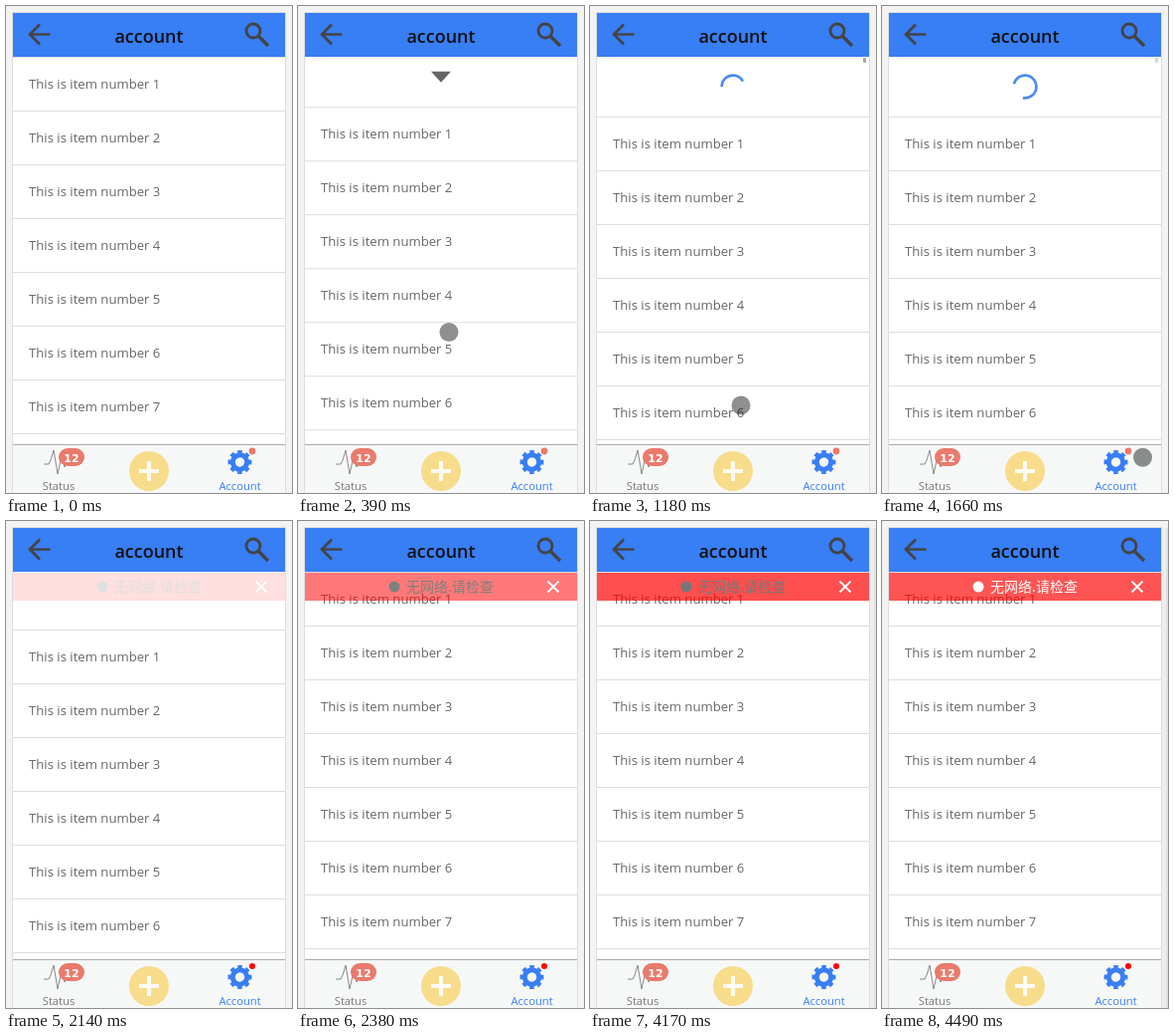
Recreate the animation shown at these times as an HTML page. Size 288 by 489 pixels, loop 5.34 s.

```html
<!DOCTYPE html>
<html lang="en">
<head>
<meta charset="utf-8">
<title>Pull to refresh</title>
<style>
  html, body { margin: 0; width: 100%; height: 100%; overflow: hidden; background: #f3f3f3; }
  svg { display: block; width: 288px; height: 489px; font-family: "Open Sans", "Noto Sans", sans-serif; }
  .item { font-size: 13.15px; fill: #666; }
  .tab { font-size: 11.2px; text-anchor: middle; }
  .line { fill: none; stroke: #444; }
</style>
</head>
<body>
<svg viewBox="0 0 288 489">
  <clipPath id="view"><path d="M7 51H281V440H7z"/></clipPath>
  <path d="M0 0H288V489H0z" fill="#f3f3f3"/>
  <g id="gutter">
    <path d="M281 7H288V489H281z" fill="#eee"/>
    <path d="M286 7H288V489H286z" fill="#e0e0e0"/>
  </g>
  <path d="M6 6H282V489H6z" fill="#ddd"/>
  <path d="M7 7H281V489H7z" fill="#fff"/>

  <g clip-path="url(#view)">
    <g id="list">
      <path id="arrow" d="M-10-5.5H10L0 5.5z" fill="#666"/>
      <g id="spinner">
        <circle id="arc" r="11.4" pathLength="163.4" fill="none" stroke="#4b8bf4" stroke-width="2.6"/>
      </g>
    </g>
    <rect id="thumb" x="275" y="52" width="3" height="5" rx="1"/>
  </g>

  <path d="M7 7H281V51H7z" fill="#387ef5"/>
  <path class="line" d="M44.5 28.5H25M34 18.5L24 28.5L34 38.5" stroke-width="2.7"/>
  <text x="144" y="36.5" font-size="18" font-weight="600" text-anchor="middle" fill="#111">account</text>
  <circle class="line" cx="249" cy="25" r="7" stroke-width="2.8"/>
  <path class="line" d="M254 30L264 40" stroke-width="3.4"/>

  <g id="notice">
    <path id="noticeFill" d="M7 52H281V80H7z" fill="#f00"/>
    <g id="noticeText">
      <circle cx="97" cy="66" r="5.5"/>
      <text x="109" y="71" font-size="14" style="font-family: 'Noto Sans CJK SC', 'Noto Sans CJK', sans-serif">无网络.请检查</text>
    </g>
    <path d="M251.500 60.500L262.500 71.500M262.500 60.500L251.500 71.500" stroke="#fff" stroke-width="1.8"/>
  </g>

  <path d="M7 440H281V489H7z" fill="#f6f8f8"/>
  <path d="M7 440H281V441H7z" fill="#aaa"/>
  <path d="M38 460H43L45 456L48 446L52 470L56 452L59 463L61 459H67" fill="none" stroke="#888"/>
  <rect x="53" y="444" width="26" height="18" rx="9" fill="#ea7a6c"/>
  <text x="66" y="457.500" font-size="11" font-weight="700" text-anchor="middle" fill="#fff" style="font-family: 'DejaVu Sans', sans-serif">12</text>
  <text class="tab" x="53" y="486" fill="#777">Status</text>
  <circle cx="144" cy="467" r="20" fill="#f7dc8b"/>
  <path d="M134 467H154M144 457V477" stroke="#fdfbf4" stroke-width="4"/>
  <g transform="translate(235.5 458) rotate(-12)" fill="none" stroke="#387ef5">
    <circle r="7.200" stroke-width="5"/>
    <circle r="10.300" stroke-width="3.400" pathLength="16" stroke-dasharray="1.1 .9"/>
  </g>
  <text class="tab" x="235.5" y="486" fill="#387ef5">Account</text>
  <circle id="dot" cx="248" cy="447"/>
  <circle id="pointer" r="9.500" fill-opacity=".44"/>
</svg>
<script>
const LOOP = 5340, HOLD = 60, PULL = 87, RELEASE = 900, DONE = 1890, ROW = 54;
const el = id => document.getElementById(id);
const set = (id, attrs) => {
  for (const name in attrs) el(id).setAttribute(name, attrs[name]);
};
const show = (id, on) => set(id, { visibility: on ? "visible" : "hidden" });
const ramp = (t, from, to) => Math.min(1, Math.max(0, (t - from) / (to - from)));
const mix = (a, b, p) => a + (b - a) * p;
const smooth = p => p * p * (3 - 2 * p);
const cubic = p => p < .5 ? 4 * p ** 3 : 1 - (2 - 2 * p) ** 3 / 2;

let rows = "";
for (let i = 0; i < 9; i++) {
  rows += `<path d="M7 ${i * ROW}h274v1h-274z" fill="#ddd"/>
    <text class="item" x="23" y="${i * ROW + 32}">This is item number ${i + 1}</text>`;
}
el("list").insertAdjacentHTML("beforeend", rows);

function listOffset(t) {
  if (t < RELEASE) return PULL * smooth(ramp(t, 60, 660));
  if (t < 1500) return mix(PULL, HOLD, cubic(ramp(t, RELEASE, 1150)));
  return HOLD * (1 - cubic(ramp(t, 2090, 2340)));
}

// One arc grows and shrinks alternately, mirrored on every second step.
function drawSpinner(t) {
  const clock = t + 1745, step = Math.floor(clock / 650) % 8;
  const v = cubic(clock % 650 / 650), odd = step % 2;
  const turn = [0, -101, -90, -11, -180, 79, -270, -191][step];
  set("arc", {
    transform: `scale(${odd ? -1 : 1} 1) rotate(${turn})`,
    "stroke-dasharray": odd ? 128 + 58 * v : 188 - 58 * v,
    "stroke-dashoffset": odd ? 182 * v : 182 - 182 * v
  });
  set("spinner", { transform: `translate(144 -30) scale(${1 - ramp(t, DONE, 2090)})` });
  show("spinner", t >= RELEASE && t < 2090);
}

function drawPointer(t) {
  const down = smooth(ramp(t, 1190, 1420)), out = smooth(ramp(t, 1420, 1740));
  const pulled = 227 + 2 * (t < RELEASE ? listOffset(t) : PULL);
  set("pointer", {
    cx: 152 + 8 * down + 121 * out,
    cy: pulled + 43 * down + 11 * out
  });
  show("pointer", t >= 70 && t < 1740);
}

function draw(t) {
  set("list", { transform: `translate(0 ${51 + listOffset(t)})` });
  set("arrow", { transform: `translate(144 -30) rotate(${180 * ramp(t, 500, 700)})` });
  show("arrow", t < RELEASE);
  drawSpinner(t);
  drawPointer(t);
  set("thumb", { opacity: .35 * (ramp(t, 470, 770) - ramp(t, 1500, 1800)) });
  show("gutter", t >= 1740 && t < 1900 || t >= 2930);
  const offline = t >= DONE;
  set("dot", { r: offline ? 3 : 3.4, fill: offline ? "#f00" : "#ea7a6c" });

  const lit = ramp(t, 4090, 4490), shade = mix(85, 255, lit);
  set("notice", { opacity: ramp(t, 2065, 2485) });
  set("noticeFill", { opacity: mix(.7, .67, lit) });
  set("noticeText", { fill: `rgb(${shade},${shade},${shade})` });
}

const start = performance.now();
function frame() {
  draw((performance.now() - start) % LOOP);
  requestAnimationFrame(frame);
}
frame();
</script>
</body>
</html>
```
